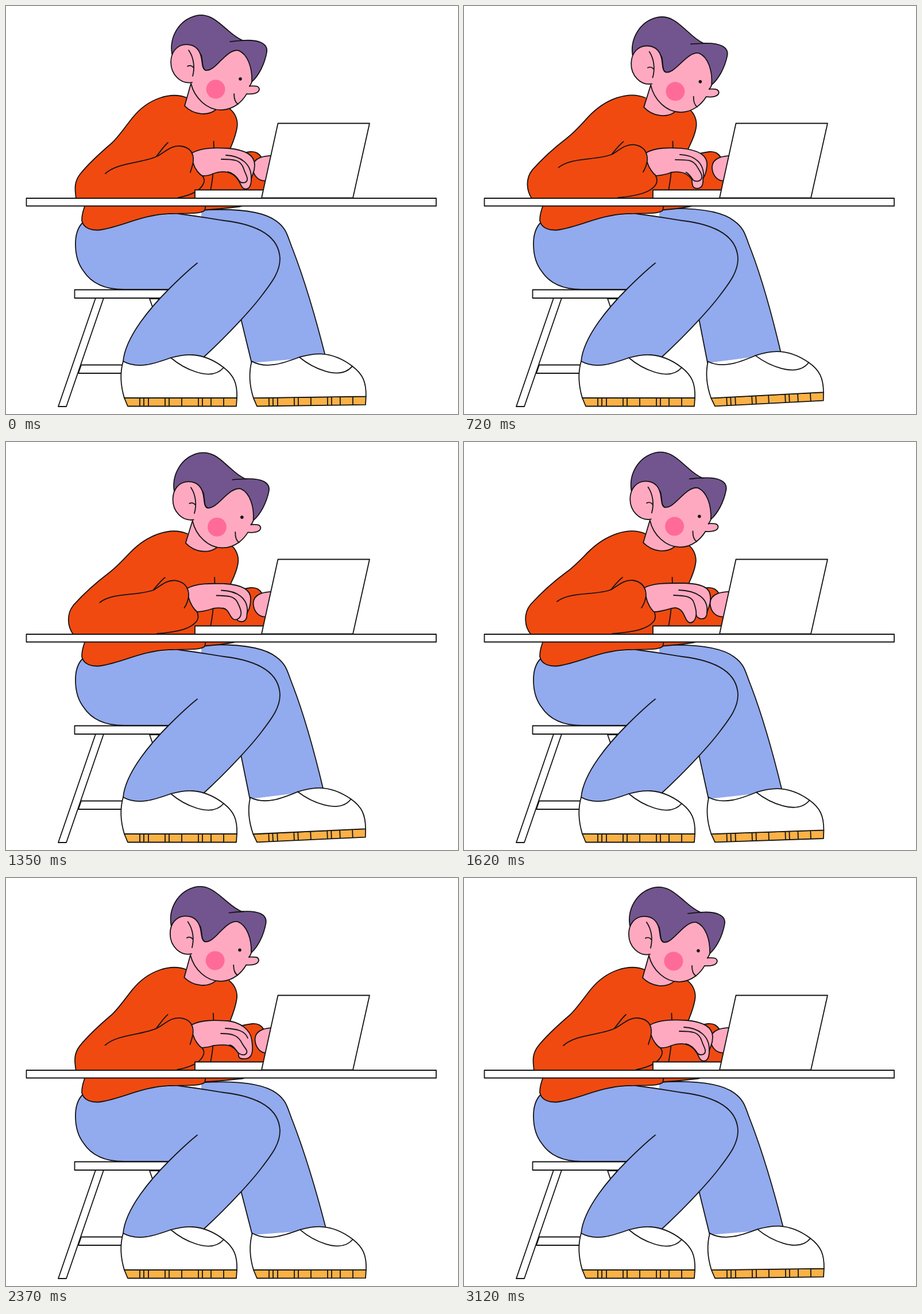
Write an HTML page with a canvas that moves like this. It is 787 px wide and 711 px high and loops after 3150 ms.

```html
<!DOCTYPE html>
<html lang="en">
<head>
<meta charset="utf-8">
<title>Typing at a desk</title>
<style>
html, body { margin: 0; width: 100%; height: 100%; overflow: hidden; background: #fff; }
canvas { display: block; width: 787px; height: 711px; }
</style>
</head>
<body>
<canvas id="stage"></canvas>
<script>
const W = 787, H = 711, LOOP = 3150;
const INK = '#141414', WHITE = '#fff', SKIN = '#ffa9c1', CHEEK = '#ff6b98',
  HAIR = '#72558f', RED = '#f04a10', BLUE = '#92aaee', SOLE = '#fbb146';
const canvas = document.getElementById('stage');
const ctx = canvas.getContext('2d');
const dpr = window.devicePixelRatio || 1;
canvas.width = W * dpr;
canvas.height = H * dpr;

const NUM = /-?\d+(\.\d+)?/g;
const lerp = (a, b, k) => a + (b - a) * k;

// Blend two path strings that share one structure.
function mix(a, b, k) {
  if (k === 0 || a === b) return a;
  const to = b.match(NUM);
  let i = 0;
  return a.replace(NUM, n => lerp(+n, +to[i++], k).toFixed(2));
}

function shift(path, dx, dy) {
  let i = 0;
  return path.replace(NUM, n => +n + (i++ % 2 ? dy : dx));
}

function fill(d, color) {
  ctx.fillStyle = color;
  ctx.fill(new Path2D(d));
}

function line(d) {
  ctx.stroke(new Path2D(d));
}

function shape(d, color) {
  fill(d, color);
  line(d);
}

function disc(x, y, r, color) {
  ctx.fillStyle = color;
  ctx.beginPath();
  ctx.arc(x, y, r, 0, 7);
  ctx.fill();
}

function turned(x, y, angle, draw) {
  ctx.save();
  ctx.translate(x, y);
  ctx.rotate(angle);
  ctx.translate(-x, -y);
  draw();
  ctx.restore();
}

// Front hand poses: outline, near finger, knuckle line.
const home = [
  'M324 256 C342 246 368 247 387 248 C410 250 433 256 433 277 C433 290 429 293 427 301 C427 313 424 319 417 319 C409 318 409 309 404 303 C396 290 380 285 361 292 C354 296 348 296 342 296 C336 293 329 284 326 274',
  'M375 267 C398 267 409 268 414 284 C417 294 421 297 420 303 C419 309 410 309 407 306 C402 298 396 291 386 289',
  'M383 260 C408 261 428 275 427 301'
];
const away = home.map(d => shift(d, -9, -2));
const press = [
  'M317 256 C334 246 360 247 377 248 C400 250 424 257 423 277 C422 290 420 296 416 300 C417 313 413 318 406 318 C397 318 397 311 397 303 C389 290 375 288 361 290 C352 294 344 295 335 296 C329 292 322 282 319 272',
  'M368 268 C390 268 399 268 406 280 C411 288 416 295 414 300 C411 307 402 306 399 303 C395 297 391 291 387 290',
  'M376 259 C400 260 419 272 417 300'
];
const spread = [
  'M314 254 C331 245 357 246 385 246 C410 247 429 252 429 270 C430 283 425 290 423 297 C423 306 418 309 412 308 C407 307 405 305 404 300 C389 290 375 287 361 290 C350 293 340 296 331 296 C326 292 319 281 317 270',
  'M365 267 C386 268 394 269 399 277 C403 286 405 297 404 302 C403 311 398 315 394 315 C383 314 386 291 368 289',
  'M374 258 C405 259 426 272 423 297'
];
const tap = [
  'M323 256 C341 246 367 248 386 249 C407 251 426 264 428 283 C429 290 430 300 428 306 C426 313 421 316 412 315 C406 315 404 311 405 306 C394 288 380 290 361 292 C354 295 348 295 341 296 C336 293 329 284 326 274',
  'M374 271 C394 271 404 274 411 288 C416 297 421 300 419 305 C416 310 408 309 403 303 C398 296 394 291 389 291',
  'M382 262 C402 263 416 266 421 279'
];

// Typing: time, front hand pose, arm reach, back hand offset.
const keys = [
  [0, home, 0, 0],
  [100, home, 0, 0],
  [340, away, .72, -8],
  [480, away, .72, -8],
  [760, press, .76, 3],
  [1180, press, .76, 3],
  [1520, spread, 1, -1],
  [1650, spread, 1, -1],
  [1840, home, 0, 0],
  [2020, home, 0, 0],
  [2300, tap, .04, 4],
  [2560, tap, .04, 4],
  [2900, home, 0, 0],
  [LOOP, home, 0, 0]
];

function typing(t) {
  const i = keys.findIndex(k => k[0] > t);
  const [t0, h0, r0, b0] = keys[i - 1], [t1, h1, r1, b1] = keys[i];
  const x = (t - t0) / (t1 - t0), k = x * x * (3 - 2 * x);
  return {
    hand: h0.map((d, n) => mix(d, h1[n], k)),
    reach: lerp(r0, r1, k),
    back: lerp(b0, b1, k)
  };
}

// Slow lean from -1 to 1 and back, shared by head and far foot.
const HIGH = 880, LOW = 2640;
function lean(t) {
  const ease = x => x * x * x * (x * (6 * x - 15) + 10);
  if (t >= HIGH && t < LOW) return 1 - 2 * ease((t - HIGH) / (LOW - HIGH));
  const s = t < HIGH ? t + LOOP : t;
  return 2 * ease((s - LOW) / (HIGH + LOOP - LOW)) - 1;
}

function stool() {
  shape('M250 510 L265 510 L280 550 L264 550Z', WHITE);
  shape('M131 625.5 H215 V640 H126Z', WHITE);
  shape('M156 509 L170 509 L105 698 L91 698Z', WHITE);
  shape('M119.5 494.5 H290 V509 H119.5Z', WHITE);
}

function shoe() {
  shape('M206 683 H402 L401 697.5 H212Z', SOLE);
  for (const x of [233, 240, 248, 277, 284, 306, 335, 342, 357, 379]) line(`M${x} 683 V697`);
  shape('M204 619 C198 640 200 663 206 683 H402 C403 658 397 644 379 630 C361 616 341 609 325 608 C310 607 298 610 287 613 C262 622 230 634 204 619Z', WHITE);
  line('M287 613 C307 630 356 657 379 630');
}

function farLeg(u) {
  const k = (u + 1) / 2, x = -5 * k, y = -4.5 * k;
  const edge = `M340 ${356.5 - 3 * k} C400 ${353 - 2 * k} 448 ${358 - 2 * k} 471 375 C490 389 490 402 500 426 C521 481 ${541 + x / 2} 548 ${557 + x} ${610 + y}`;
  fill(edge + ` L${510 + x} ${616 + y} L${429 + x} 622 L409 545 L340 400Z`, BLUE);
  line(edge);
  line(`M409 545 L${429 + x} 622`);
  turned(436, 698, -.053 * k, () => {
    ctx.translate(225, 0);
    shoe();
  });
}

function nearLeg() {
  const seat = 'M134 377 C115 395 118 440 135 462 C150 485 175 494 205 494 H283 C255 522 208 575 204 619';
  const knee = 'C340 367 352 370 380 374 C430 380 475 397 477 440 C477 462 465 479 445 505 C430 525 390 570 343 613';
  fill(seat + ' C225 632 250 626 287 613 L343 613 C390 570 430 525 445 505 C465 479 477 462 477 440 C475 397 430 380 380 374 C352 370 340 367 300 362Z', BLUE);
  line(seat);
  line('M300 362 ' + knee);
  line('M333 448 C318 460 300 477 283 494');
  shoe();
}

function hem(u) {
  const end = 403 - 10 * u;
  shape(`M340 346 H${end + 10} L${end} 349.5 Q370 354 346 355.5Z`, RED);
  shape('M138 346 C134 358 132 364 132 374 C135 388 150 392 165 390 C204 384 235 364 285 362 C310 361 336 363 345 357 C348 354 347 350 347 346Z', RED);
}

function torso(u, reach) {
  const e = (u + .5) * 1.3;
  const back = mix(
    'M315 160 C288 149 248 160 220 195 C205 214 195 229 184 239 C163 257 145 273 129 293 C118 307 120 320 122 336',
    'M316 160 C286 147 246 162 216 192 C203 205 192 217 178 227 C155 244 135 262 116 283 C103 299 105 322 117 336', reach);
  const chest = `C392 244 ${399 + e} 230 ${402 + e} 213 C${405 + e} 200 ${399 + e} 186 ${389 + e} 179`;
  fill(back + ' H356 C358 310 361 290 362 262 L390 250 ' + chest + ' L340 170Z', RED);
  line(back);
  line('M390 250 ' + chest);
  line(`M${361.5 + e} 236 L${362 + e} 250`);
}

function farArm(b) {
  const sleeve = `M380 262 C396 262 ${411 + b} 255 ${425 + b} 254 C${436 + b} 253 ${441 + b} 258 ${445 + b} 264`;
  fill(sleeve + ` L456 290 V322 H356 C359 306 361 296 361 280Z`, RED);
  line(sleeve);
  line('M361 280 C361 296 359 306 356 322');
  shape(`M${470 + b} 261 C${447 + b} 260 ${430 + b} 265 ${429.5 + b} 281 C${430 + b} 297 ${441 + b} 306 454 304.5 L470 300`, SKIN);
}

function nearArm({ hand, reach }) {
  const [outline, finger, knuckle] = hand;
  const pose = (a, b) => mix(a, b, reach);
  const under = pose(
    'M341 295 C346 300 346 306 343 311 C338 321 325 329 300 334',
    'M331 295 C334 302 334 308 330 313 C320 325 300 331 258 334');
  fill(under + pose(' L300 290Z', ' L290 290Z'), RED);
  line(under);
  shape(outline, SKIN);
  line(knuckle);
  shape(finger, SKIN);
  line(pose(
    'M173 292 C195 272 240 274 265 261 C280 252 288 243 303 244 C322 246 327 258 326 271 C325 279 322 285 321 290',
    'M162 278 C185 260 230 268 257 257 C272 247 280 240 294 241 C312 244 317 255 317 268 C316 276 312 285 309 289'));
  line(pose('M282 238 C276 243 269 253 262 262', 'M276 236 C270 240 262 250 256 257'));
}

function head() {
  const collar = 'M322 135 L311 174 C327 190 351 192 365 181';
  fill(collar + ' L380 160Z', SKIN);
  line(collar);
  const face = 'M322 135 C328 160 350 182 376 181 C398 180 412 165 419 153 C430 154 440 152 441 145 C440 137 431 140 424 139';
  fill(face + ' L428 132 C429 105 420 82 405 77 L340 70Z', SKIN);
  line(face);
  shape('M289 84 C284 55 300 25 330 17 C355 11 371 30 386 42 C395 50 403 56 412 60 C440 58 456 65 454 80 C450 102 440 121 428 132 C429 108 421 84 405 77.5 C393 75 381 88 371 98 C362 107 355 113 348 112 C341 110 343 98 340 86 C325 60 300 65 289 84Z', HAIR);
  line('M390 62 C400 61 406 60 415 60');
  line('M428 132 C427 136 425 138 424 140');
  const ear = 'M324 133 C304 137 287 119 287 98 C287 80 298 67 314 67 C330 67 339 77 341 96';
  fill(ear + ' L341 112 L326 134Z', SKIN);
  line(ear + ' C342 104 343 111 348 112');
  line('M318 77 C327 90 329 107 325 122');
  line('M316 105 C320 103 324 104 326 107');
  disc(365, 145, 16.5, CHEEK);
  disc(408, 127, 2.8, INK);
  line('M397 153 C397 163 399 168 404 171');
}

function desk() {
  shape('M329 320.5 H460 V335 H329Z', WHITE);
  shape('M473.5 204.5 H633 L604 334.5 H445Z', WHITE);
  shape('M35.5 335 H749 V348.5 H35.5Z', WHITE);
}

function draw(t) {
  const u = lean(t), type = typing(t);
  ctx.setTransform(dpr, 0, 0, dpr, 0, 0);
  ctx.fillStyle = WHITE;
  ctx.fillRect(0, 0, W, H);
  ctx.strokeStyle = INK;
  ctx.lineWidth = 1.8;
  ctx.lineCap = ctx.lineJoin = 'round';
  stool();
  farLeg(u);
  nearLeg();
  hem(u);
  torso(u, type.reach);
  turned(220, 258, (u + .5) * .0175, head);
  farArm(type.back);
  nearArm(type);
  desk();
}

function tick() {
  const t = performance.now() % LOOP;
  draw(Math.floor(t / 30) * 30);
  requestAnimationFrame(tick);
}
tick();
</script>
</body>
</html>
```
